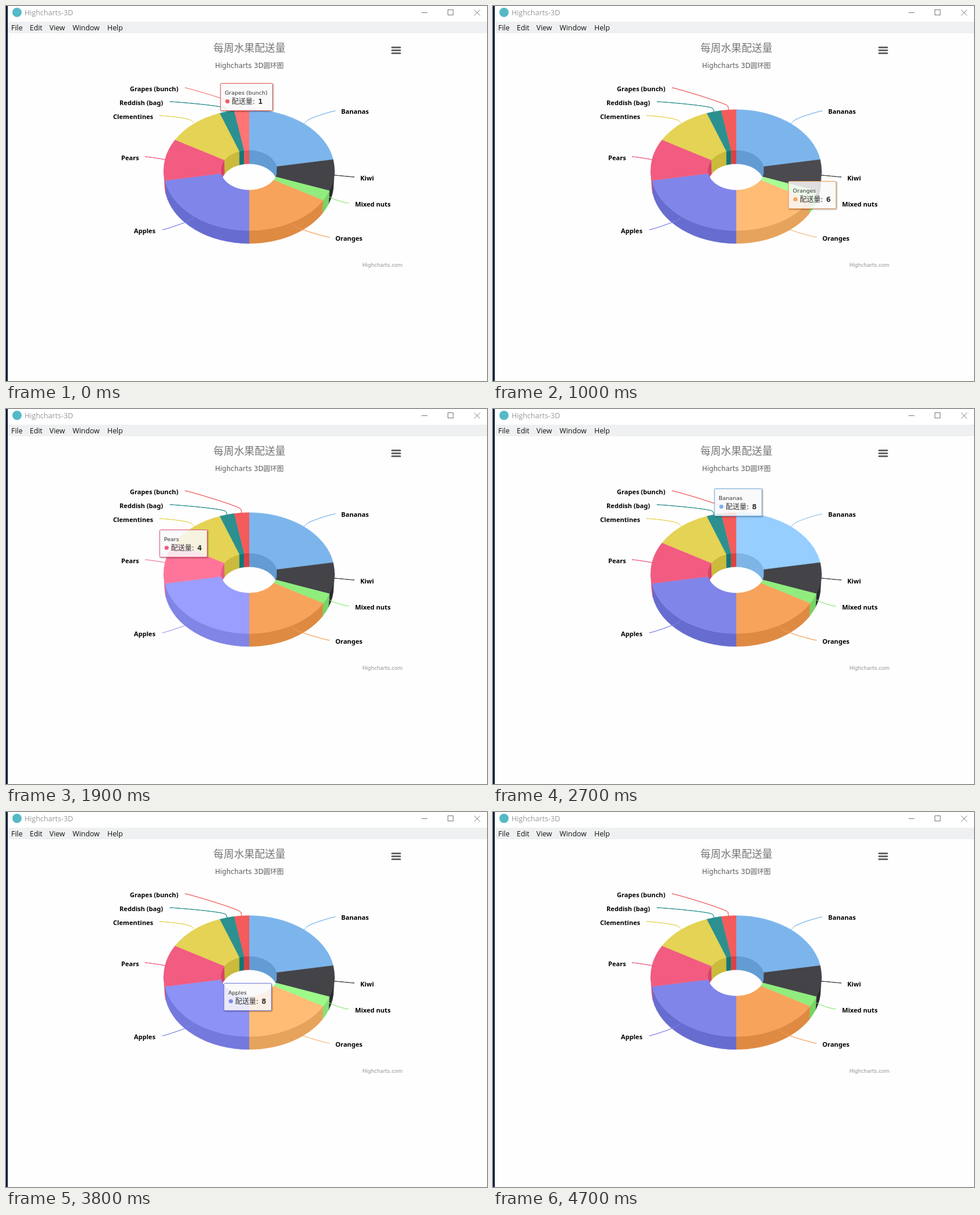
An HTML page that plays this animation: 831x647 px, repeating every 5.4 s.

```html
<!DOCTYPE html>
<html lang="zh">
<head>
<meta charset="utf-8">
<title>3D donut</title>
<style>
html, body { margin: 0; width: 100%; height: 100%; overflow: hidden; background: #fefefe; }
svg { display: block; position: absolute; left: 0; top: 0; }
text { white-space: pre; }
.ui { font-family: "Open Sans", "Noto Sans", sans-serif; font-size: 12.4px; }
.chart { font-family: "DejaVu Sans", "Noto Sans CJK SC", "Noto Sans CJK", sans-serif; }
.label { font: bold 11.1px "Noto Sans", "Open Sans", sans-serif; }
.title { font: 300 17.8px "Noto Sans CJK SC", "Noto Sans CJK", sans-serif; }
</style>
</head>
<body>
<svg id="stage" width="831" height="647" viewBox="0 0 831 647">
  <rect width="831" height="27" fill="#fff"/>
  <rect y="27" width="831" height="20" fill="#eff0f1"/>
  <rect width="3" height="647" fill="#06183a"/>
  <circle cx="19" cy="11" r="8" fill="#55b9c6"/>
  <text class="ui" x="32" y="16" style="font-size:12.6px" fill="#999">Highcharts-3D</text>
  <g fill="none" stroke="#777">
    <path d="M718 11.5H728M809 6.5L819 16.5M819 6.5L809 16.5"/>
    <rect x="763.5" y="6.5" width="9" height="9"/>
  </g>
  <g class="ui" fill="#111">
    <text x="9" y="42">File</text><text x="41" y="42">Edit</text><text x="75" y="42">View</text>
    <text x="115" y="42">Window</text><text x="175" y="42">Help</text>
  </g>
  <text class="title" x="420.5" y="79" text-anchor="middle" fill="#777">每周水果配送量</text>
  <text class="chart" x="420.5" y="107" font-size="11.7" text-anchor="middle" fill="#5c5c5c">Highcharts 3D圆环图</text>
  <path d="M667 71.5H681M667 76.5H681M667 81.5H681" stroke="#666" stroke-width="3" stroke-linecap="round"/>
  <text class="chart" x="685" y="450" font-size="8.8" text-anchor="end" fill="#909090">Highcharts.com</text>
  <g id="under" fill="none"></g>
  <g id="walls"></g>
  <g id="tops"></g>
  <g id="over" fill="none"></g>
  <g id="labels" class="label"></g>
  <g id="tip" class="chart" fill="#333"></g>
</svg>
<script>
const CX = 420, CY = 283, RX = 147.5, RIN = 49, TILT = 0.7071;
const DEPTH = 23.5, SHRINK = 0.99; // the lower rim is farther away
const LOOP = 5400, STEP = 100, FIRST = 700, LAST = 4700;

// name, value, colour, label x, label baseline, connector
const slices = [
  ['Bananas', 8, [124, 181, 236], 579, 186, 'M569 181C564 181 521 194 519 199L515 203'],
  ['Kiwi', 3, [67, 67, 72], 612, 301, 'M602 295C597 295 572 292 567 292'],
  ['Mixed nuts', 1, [144, 237, 125], 603, 346, 'M592 340C587 340 567 334 562 331L558 329'],
  ['Oranges', 6, [247, 163, 92], 569, 405, 'M559 399C554 399 501 384 498 379L494 375'],
  ['Apples', 8, [128, 133, 233], 221, 392, 'M270 386C275 386 318 371 321 368L325 364'],
  ['Pears', 4, [241, 92, 128], 199, 266, 'M240 260C245 260 270 264 275 265'],
  ['Clementines', 4, [228, 211, 84], 185, 195, 'M265 189C270 189 320 193 322 199L325 202'],
  ['Reddish (bag)', 1, [43, 144, 143], 196, 171, 'M283 165C288 165 379 172 380 177L382 182'],
  ['Grapes (bunch)', 1, [244, 91, 91], 214, 147, 'M309 141C314 141 405 168 406 173L407 180'],
].map(([name, value, rgb, x, y, line]) => ({ name, value, rgb, x, y, line }));

// time, hovered slice
const hovers = [[-1000, 8], [685, 1], [790, 2], [920, 3], [1358, 4], [1850, 5], [2050, 6],
  [2400, 0], [3340, 2], [3630, 3], [3775, 4], [4140, 0], [4340, -1]];

// time, left, top of the tooltip
const path = [[0, 370, 133], [699, 370, 133], [700, 546, 231], [800, 574, 268], [900, 558, 287],
  [1000, 510, 302], [1200, 415, 298], [1400, 370, 273], [1500, 350, 298], [1600, 310, 300],
  [1800, 269, 246], [1900, 265, 208], [2100, 275, 165], [2400, 328, 124], [2700, 382, 137],
  [3000, 445, 178], [3200, 470, 210], [3400, 474, 255], [3600, 440, 285], [3800, 376, 295],
  [3900, 373, 296], [4000, 385, 290], [4100, 420, 250], [4200, 482, 176], [4300, 492, 175]];

const $ = id => document.getElementById(id);
function add(parent, tag, attrs, text) {
  const el = document.createElementNS('http://www.w3.org/2000/svg', tag);
  set(el, attrs);
  if (text !== undefined) el.textContent = text;
  return parent.appendChild(el);
}
function set(el, attrs) {
  for (const k in attrs) el.setAttribute(k, attrs[k]);
}
const css = rgb => `rgb(${rgb.map(c => Math.round(Math.max(0, Math.min(255, c)))).join()})`;
const clamp = v => Math.max(0, Math.min(1, v));

function point(deg, r, drop = 0) {
  const a = deg * Math.PI / 180;
  return `${(CX + r * Math.sin(a)).toFixed(2)} ${(CY - r * TILT * Math.cos(a) + drop).toFixed(2)}`;
}
// Ring section between two edges, each given as radius and drop
function band(from, to, r1, d1, r2, d2) {
  const arc = (r, sweep) => `A${r} ${r * TILT} 0 0 ${sweep} `;
  return `M${point(from, r1, d1)}${arc(r1, 1)}${point(to, r1, d1)}` +
    `L${point(to, r2, d2)}${arc(r2, 0)}${point(from, r2, d2)}Z`;
}

const total = slices.reduce((sum, s) => sum + s.value, 0);
let angle = 0;
for (const s of slices) {
  const from = angle, to = angle += s.value / total * 360;
  const wall = (lo, hi, r) => {
    const a = Math.max(from, lo), b = Math.min(to, hi);
    if (a < b) s.walls.push(add($('walls'), 'path', {
      d: band(a, b, r, 0, r * SHRINK, DEPTH), 'stroke-width': 0.5 }));
  };
  s.walls = [];
  wall(0, 90, RIN);
  wall(270, 360, RIN);
  wall(90, 270, RX);
  s.top = add($('tops'), 'path', { d: band(from, to, RX, 0, RIN, 0), 'stroke-width': 0.5 });
  add($('under'), 'path', { d: s.line, stroke: css(s.rgb) });
  s.over = add($('over'), 'path', { d: s.line, stroke: css(s.rgb) });
  add($('labels'), 'text', { x: s.x, y: s.y }, s.name);
}

const tip = $('tip');
const boxes = [[5, 0.05], [3, 0.1], [1, 0.15]].map(([w, o]) => add(tip, 'rect', {
  x: 1.5, y: 1.5, rx: 2, height: 47, fill: 'none', stroke: '#000', 'stroke-width': w, 'stroke-opacity': o }));
const frame = add(tip, 'rect', { x: 0.5, y: 0.5, rx: 2, height: 47, fill: '#f9f9f9', 'fill-opacity': 0.85 });
boxes.push(frame);
const head = add(tip, 'text', { x: 8, y: 20, 'font-size': 9.5 });
const dot = add(tip, 'circle', { cx: 12.5, cy: 31.5, r: 3.6 });
add(tip, 'text', { x: 20, y: 35.5, 'font-size': 12 }, '配送量:');
const count = add(tip, 'text', { x: 65.5, y: 35.5, 'font-size': 11.5, 'font-weight': 'bold' });

// Fast rise on entry, short eased fall after leaving
function glow(i, t) {
  let best = 0;
  hovers.forEach(([start, id], n) => {
    if (id !== i || t < start) return;
    const end = n + 1 < hovers.length ? hovers[n + 1][0] : LOOP;
    const rise = clamp((t - start) / 50);
    const fall = (1 + Math.cos(Math.PI * clamp((t - end - 40) / 260))) / 2;
    best = Math.max(best, rise * fall);
  });
  return best;
}

function place(t) {
  let n = 0;
  while (n < path.length - 1 && path[n + 1][0] <= t) n++;
  const a = path[n], b = path[n + 1] || a;
  const k = a === b ? 0 : (t - a[0]) / (b[0] - a[0]);
  return [1, 2].map(j => Math.round(a[j] + (b[j] - a[j]) * k));
}

function render(t) {
  slices.forEach((s, i) => {
    const g = glow(i, t);
    const face = s.rgb.map(c => Math.min(255, c + 25 * g));
    const top = css(face), side = css(face.map(c => c - 25));
    set(s.top, { fill: top, stroke: top });
    s.walls.forEach(w => set(w, { fill: side, stroke: side }));
    s.over.style.display = g > 0.6 ? 'none' : '';
  });
  const id = hovers.filter(h => h[0] <= t && h[1] >= 0).pop()[1];
  const s = slices[id], color = css(s.rgb);
  const [x, y] = place(t);
  set(tip, { transform: `translate(${x} ${y})`, opacity: clamp((LAST - t) / 200) });
  boxes.forEach(b => set(b, { width: s.name.length > 12 ? 90 : 82 }));
  set(frame, { stroke: color });
  set(dot, { fill: color });
  head.textContent = s.name;
  count.textContent = s.value;
}

const begin = performance.now();
let shown = -1;
function tick() {
  const t = (performance.now() - begin) % LOOP;
  const step = t < FIRST ? 0 : Math.min(LAST, Math.floor(t / STEP) * STEP);
  if (step !== shown) render(shown = step);
  requestAnimationFrame(tick);
}
tick();
</script>
</body>
</html>
```
